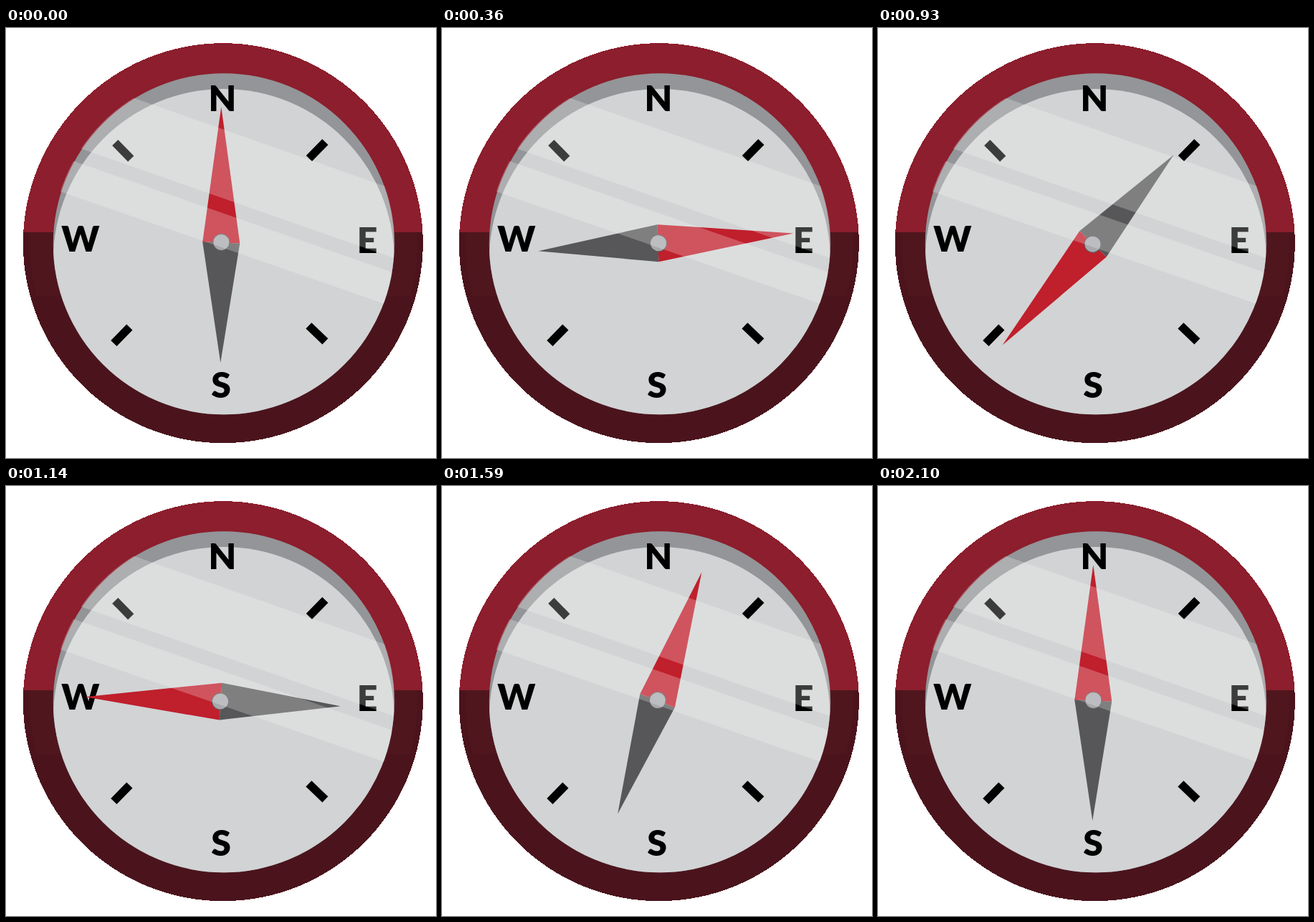
An HTML page that plays this animation: 600 px wide and 600 px high, repeating every 2430 ms.

```html
<!DOCTYPE html>
<html>
<head>
<meta charset="utf-8">
<title>Compass</title>
<style>
  html, body { margin: 0; width: 100%; height: 100%; overflow: hidden; background: #fff; }
  svg { display: block; width: 100vw; height: 100vh; }
  text { font: 900 50px Lato, "Open Sans", sans-serif; text-anchor: middle; }
</style>
</head>
<body>
<svg viewBox="0 0 600 600">
  <defs>
    <clipPath id="dial"><circle cx="303.8" cy="301.2" r="238"/></clipPath>
    <clipPath id="glass"><circle cx="303.3" cy="301.2" r="239"/></clipPath>
    <clipPath id="lower"><rect y="285" width="600" height="315"/></clipPath>
    <clipPath id="belt"><rect y="285" width="600" height="89"/></clipPath>
  </defs>

  <g shape-rendering="crispEdges">
    <circle cx="302.8" cy="300.2" r="279" fill="#8c1e2d"/>
    <circle cx="302.8" cy="300.2" r="279" fill="#4b141d" clip-path="url(#lower)"/>
    <circle cx="303.5" cy="300.2" r="270.5" fill="#4f161e" clip-path="url(#belt)"/>
  </g>

  <circle cx="303.8" cy="301.2" r="238" fill="#939598"/>
  <g clip-path="url(#dial)">
    <circle cx="303.8" cy="322.8" r="237.8" fill="#d1d3d4"/>
  </g>

  <path d="M152.3 159.9L174.3 182.4M422.9 181.9L445.4 158.9M150.4 439.9L172.4 417.4M422.4 415.4L445.4 437.4" stroke="#000" stroke-width="11.5"/>
  <text x="302" y="115.7">N</text>
  <text x="504" y="314">E</text>
  <text x="300" y="516">S</text>
  <text x="104" y="312.3">W</text>

  <g id="needle">
    <path d="M274.3 298.5L326.3 300.5L299.3 467Z" fill="#575759"/>
    <path d="M274.3 298.5L300.3 110L326.3 300.5Z" fill="#c01f2c"/>
    <circle cx="300.4" cy="299" r="11.5" fill="#a7a9ac" stroke="#58595b"/>
  </g>

  <g clip-path="url(#glass)" fill="#fff" fill-opacity=".235">
    <path d="M40 49L560 231.8V327.5L40 145.8Z"/>
    <path d="M40 166.7L560 348.2V395.9L40 215.7Z"/>
  </g>
</svg>
<script>
const needle = document.getElementById("needle");
const STEP = 30, LOOP = 2430;

// [step, degrees, softness]: softness blends linear travel into a cosine ease
const keys = [[0, 0, 0], [45, 322, 0], [56, 394.4, .6], [66.2, 322.5, .6], [70, 360, .3]];

function angleAt(step) {
  const i = keys.findIndex(k => step < k[0]);
  if (i < 0) return 0;
  const [t0, a0] = keys[i - 1], [t1, a1, soft] = keys[i];
  const u = (step - t0) / (t1 - t0);
  const eased = (1 - Math.cos(Math.PI * u)) / 2;
  return a0 + (a1 - a0) * (u + (eased - u) * soft);
}

function draw() {
  const step = Math.floor(performance.now() % LOOP / STEP);
  needle.setAttribute("transform", `rotate(${angleAt(step)} 300.5 300.5)`);
  requestAnimationFrame(draw);
}
draw();
</script>
</body>
</html>
```
